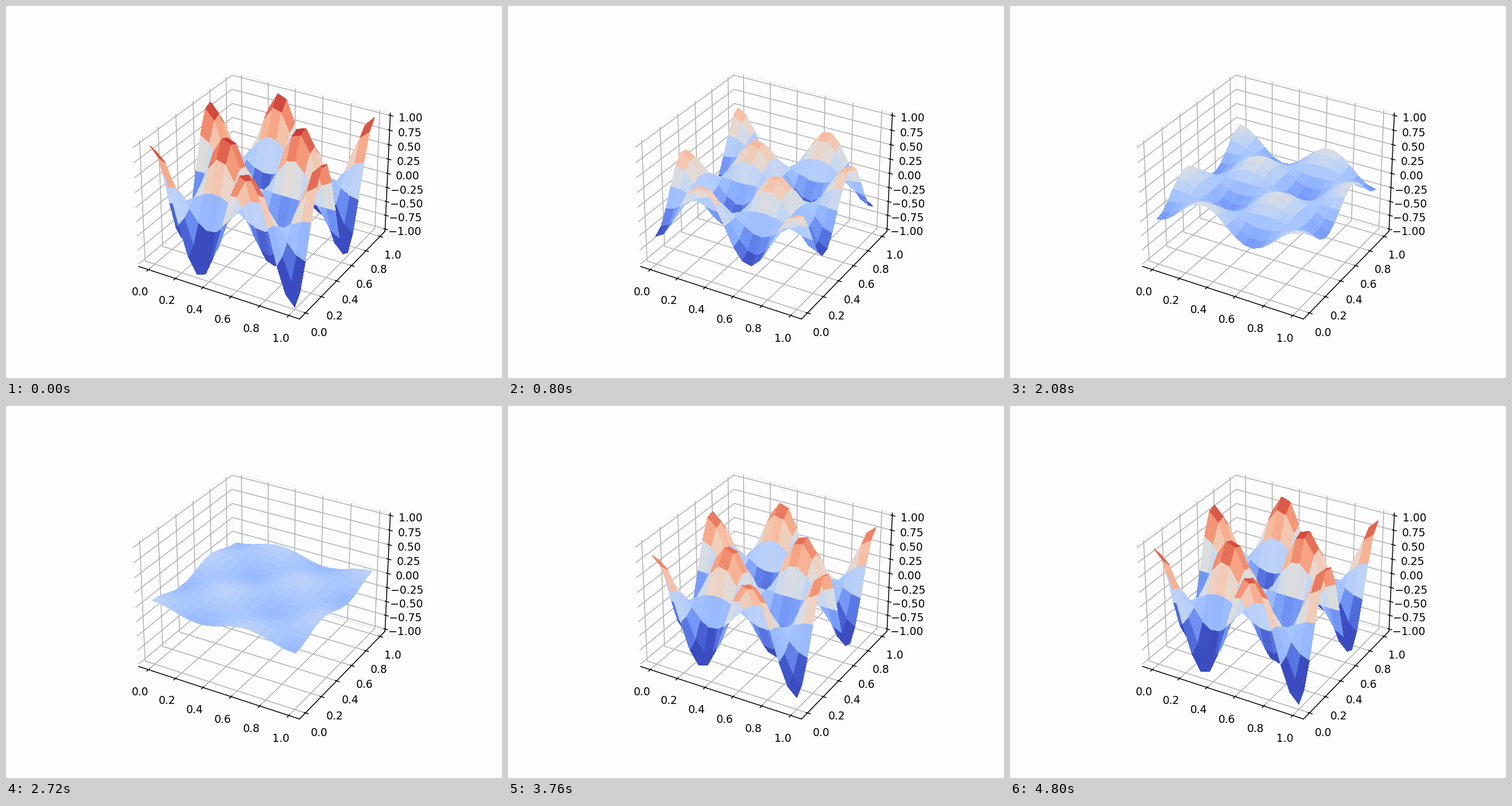
A matplotlib script for the animation above (4.88 s loop, 864 px wide and 648 px high).

```python
import numpy as np
import matplotlib.pyplot as plt
from matplotlib.animation import FuncAnimation

FRAMES = 61
INTERVAL = 80
CELLS = 16
MODE = 3 * np.pi
PAPER = "#fdfdfd"

# Phase advance per step of a leapfrog wave solver with time step h / 2
OMEGA = 2 * np.arcsin(np.sin(MODE / (2 * CELLS)) / np.sqrt(2))

grid = np.linspace(0, 1, CELLS + 1)
X, Y = np.meshgrid(grid, grid, indexing="ij")
SHAPE = np.cos(MODE * X) * np.cos(MODE * Y)


def padded(low, high):
    """Widen a range by the 1/48 gap between the data and the box."""
    gap = (high - low) / 48
    return low - gap, high + gap


fig = plt.figure(figsize=(6.4, 4.8), dpi=135, facecolor=PAPER)
ax = fig.add_subplot(projection="3d", facecolor="none")
ax.set(xlim=padded(-0.05, 1.05), ylim=padded(-0.05, 1.05), zlim=padded(-1, 1))
for axis in (ax.xaxis, ax.yaxis, ax.zaxis):
    axis.pane.fill = False

surfaces = []


def draw(step):
    while surfaces:
        surfaces.pop().remove()
    surfaces.append(ax.plot_surface(
        X, Y, SHAPE * np.cos(OMEGA * step),
        cmap="coolwarm", vmin=-0.5, vmax=1,
        linewidth=0, antialiased=False))
    return surfaces


anim = FuncAnimation(fig, draw, frames=FRAMES, interval=INTERVAL,
                     init_func=lambda: draw(0), repeat=True, repeat_delay=0)
plt.show()
```
